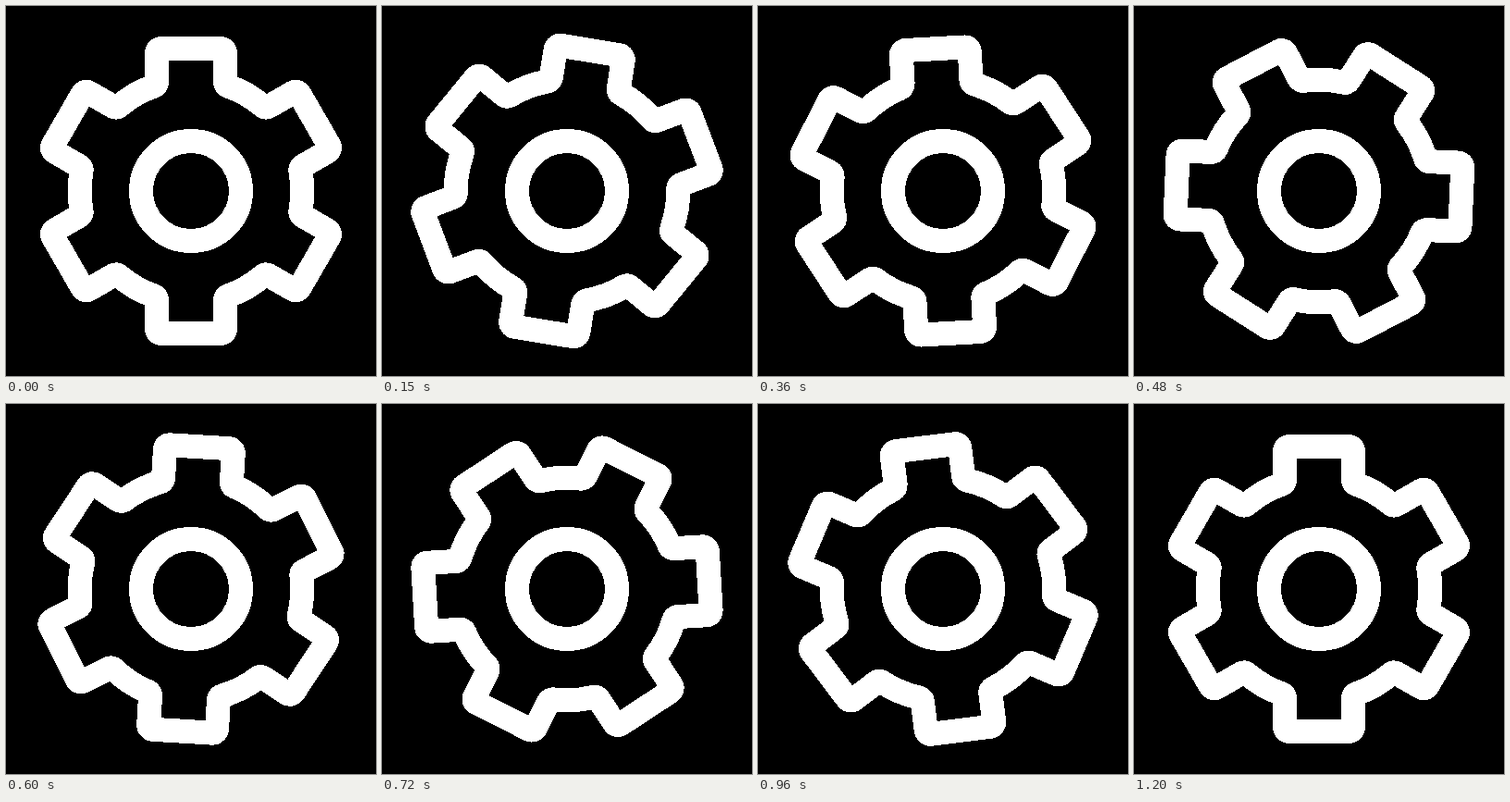
An HTML page that plays this animation: 400 by 400 pixels, repeating every 3230 ms.

```html
<!DOCTYPE html>
<html lang="en">
<head>
<meta charset="utf-8">
<title>Turning gear</title>
<style>
  html, body { margin: 0; width: 100%; height: 100%; overflow: hidden; background: #000; }
  svg { display: block; width: 400px; height: 400px; }
</style>
</head>
<body>
<svg viewBox="-200 -200 400 400" fill="none" stroke="#fff" stroke-width="26"
     stroke-linejoin="round" shape-rendering="crispEdges">
  <path id="gear"/>
  <circle r="54"/>
</svg>
<script>
const LOOP = 3230, TURN = 1200, STEP = 30;
const TEETH = 6, BODY = 120.3, HALF = 37, TOP = 154, ROUND = 5;
const gear = document.getElementById('gear');

// Cubic bezier easing with control points (x1, 0) and (x2, 1)
function ease(x, x1 = 0.337, x2 = 0.377) {
  let lo = 0, hi = 1;
  for (let i = 0; i < 30; i++) {
    const s = (lo + hi) / 2, r = 1 - s;
    if (3 * r * r * s * x1 + 3 * r * s * s * x2 + s * s * s < x) lo = s;
    else hi = s;
  }
  return lo * lo * (3 - 2 * lo);
}

// Outline of the toothed wheel, every corner rounded
function gearPath() {
  const foot = HALF + ROUND;
  const reach = BODY + ROUND;
  const rise = Math.sqrt(reach * reach - foot * foot);
  const edge = BODY / reach;
  let d = '';

  for (let i = 0; i < TEETH; i++) {
    const a = i * 2 * Math.PI / TEETH;
    const cos = Math.cos(a), sin = Math.sin(a);
    const at = (x, y) => `${(x * cos - y * sin).toFixed(3)} ${(x * sin + y * cos).toFixed(3)}`;
    const arc = (r, sweep, x, y) => `A${r} ${r} 0 0 ${sweep} ${at(x, y)}`;

    d += i ? arc(BODY, 1, -foot * edge, -rise * edge) : 'M' + at(-foot * edge, -rise * edge);
    d += arc(ROUND, 0, -HALF, -rise);
    d += 'L' + at(-HALF, ROUND - TOP) + arc(ROUND, 1, ROUND - HALF, -TOP);
    d += 'L' + at(HALF - ROUND, -TOP) + arc(ROUND, 1, HALF, ROUND - TOP);
    d += 'L' + at(HALF, -rise) + arc(ROUND, 0, foot * edge, -rise * edge);
  }
  return d + `A${BODY} ${BODY} 0 0 1 ${-foot * edge} ${-rise * edge}Z`;
}

function draw(time) {
  const t = Math.floor((time % LOOP) / STEP) * STEP;
  const angle = t < TURN ? 180 * ease(t / TURN) : 0;
  gear.setAttribute('transform', `rotate(${angle.toFixed(3)})`);
}

gear.setAttribute('d', gearPath());
const start = performance.now();
function tick() {
  draw(performance.now() - start);
  requestAnimationFrame(tick);
}
tick();
</script>
</body>
</html>
```
